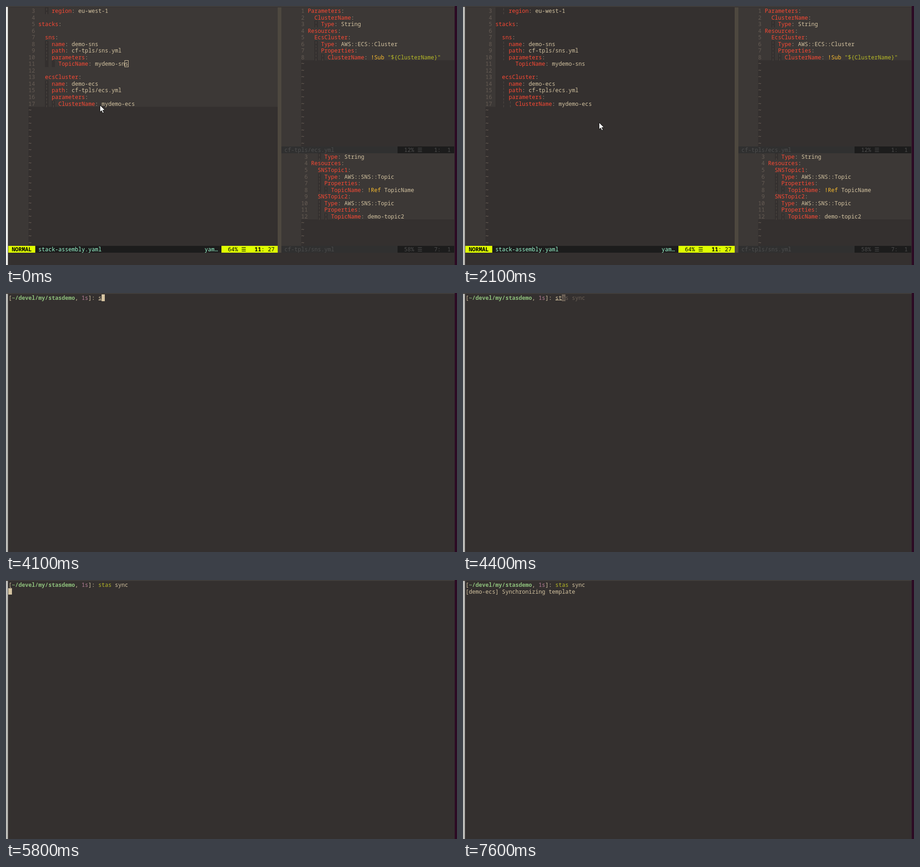
Write an HTML page with a canvas that moves like this. It is 986x568 px and loops after 8 s.

```html
<!DOCTYPE html>
<html lang="en">
<head>
<meta charset="utf-8">
<title>Terminal session</title>
<style>
html, body { margin: 0; width: 100%; height: 100%; overflow: hidden; background: #34302f; }
canvas { display: block; }
</style>
</head>
<body>
<canvas id="stage" width="986" height="568"></canvas>
<script>
const ctx = document.getElementById('stage').getContext('2d');
const LOOP = 8000, CW = 7.27, RH = 14.54, LEFT = 5.4, TOP = 3;
const C = {
  bg: '#34302f', light: '#3c3836', split: '#4e483f', fg: '#d5c4a1', red: '#fb4934',
  colon: '#a89984', yellow: '#fabd2f', green: '#b8bb26', path: '#8ec07c', time: '#b9809a',
  num: '#665c54', dim: '#6b6056', guide: '#5a514b', bar: '#1c1c1c', barOff: '#303030',
  barText: '#4e4e4e', lime: '#dfff00', mint: '#9cffd3', black: '#000'
};

const px = col => Math.round(LEFT + col * CW);
const py = row => Math.round(TOP + row * RH);

function cells(col, row, cols, rows, color) {
  ctx.fillStyle = color;
  ctx.fillRect(px(col), py(row), px(col + cols) - px(col), py(row + rows) - py(row));
}

// Writes on the character grid and returns the next free column.
function write(text, col, row, color, bold) {
  ctx.font = (bold ? 'bold ' : '') + '12.1px "Noto Sans Mono", "DejaVu Sans Mono", monospace';
  ctx.fillStyle = color;
  for (const ch of text) {
    if (ch !== ' ') ctx.fillText(ch, LEFT + col * CW, py(row) + 11.5);
    col++;
  }
  return col;
}

function underline(col, row, n) {
  ctx.fillStyle = C.fg;
  ctx.fillRect(px(col), py(row) + 12, px(col + n) - px(col), 1);
}

const stackFile = `    region: eu-west-1

stacks:

  sns:
    name: demo-sns
    path: cf-tpls/sns.yml
    parameters:
      TopicName: mydemo-sns

  ecsCluster:
    name: demo-ecs
    path: cf-tpls/ecs.yml
    parameters:
      ClusterName: mydemo-ecs`.split('\n');

const ecsFile = `Parameters:
  ClusterName:
    Type: String
Resources:
  EcsCluster:
    Type: AWS::ECS::Cluster
    Properties:
      ClusterName: !Sub "\${ClusterName}"`.split('\n');

const snsFile = `    Type: String
Resources:
  SNSTopic1:
    Type: AWS::SNS::Topic
    Properties:
      TopicName: !Ref TopicName
  SNSTopic2:
    Type: AWS::SNS::Topic
    Properties:
      TopicName: demo-topic2`.split('\n');

function yamlLine(line, col, row, current) {
  const match = line.match(/^( *)(\w+)(:)( ?)(!\w+)?(.*)$/);
  if (!match) return;
  const [, indent, key, colon, gap, tag = '', value] = match;
  for (let i = 2; i < indent.length; i += 2) {
    cells(col + i, row, 1, 1, C.bg);
    if (!current) write('¦', col + i, row, C.guide);
  }
  let x = write(key, col + indent.length, row, C.red);
  x = write(colon, x, row, C.colon) + gap.length;
  x = write(tag, x, row, C.yellow);
  write(value, x, row, value.includes('"') ? C.green : C.fg);
}

function pane(lines, o) {
  const end = o.row + lines.length;
  cells(o.gutter, o.row, o.numCol - o.gutter, o.last - o.row, C.light);
  cells(o.numCol, o.row, o.col - o.numCol, lines.length, C.light);
  if (o.lit) cells(o.col, o.row, o.right - o.col, lines.length, C.light);
  lines.forEach((line, i) => {
    const n = String(o.first + i);
    write(n, o.col - 1 - n.length, o.row + i, C.num);
    yamlLine(line, o.col, o.row + i, i === o.current);
  });
  for (let r = end; r < o.last; r++) write('~', o.numCol, r, '#7c6f64');
}

function idleBar(row, file, percent, line) {
  cells(82, row, 35, 1, C.barOff);
  cells(117, row, 17, 1, C.bar);
  write(file, 83, row, C.barText);
  write(percent + ' ☰', 119, row, C.barText);
  write(line + ':  1', 128, row, C.barText);
}

function activeBar() {
  cells(0, 36, 8, 1, C.lime);
  cells(8, 36, 56, 1, C.bar);
  cells(64, 36, 17, 1, C.lime);
  write('NORMAL', 1, 36, C.black, true);
  write('stack-assembly.yaml', 9, 36, C.mint);
  write('yam…', 59, 36, C.mint);
  write('64% ☰', 66, 36, C.black);
  write('11', 74, 36, C.black, true);
  write(': 27', 76, 36, C.black);
}

function pointer(x, y) {
  ctx.beginPath();
  [[0, 0], [0, 15], [3.5, 12], [6, 17.5], [8.5, 16.3], [6, 11], [10.7, 10.6]]
    .forEach(([dx, dy]) => ctx.lineTo(x + dx + 0.5, y + dy + 0.5));
  ctx.closePath();
  ctx.fillStyle = '#fff';
  ctx.strokeStyle = '#111';
  ctx.lineWidth = 1;
  ctx.fill();
  ctx.stroke();
}

function editor(t) {
  pane(stackFile, { gutter: 0, numCol: 6, col: 9, right: 81, row: 0, last: 36,
                    first: 3, lit: t < 700, current: 8 });
  pane(ecsFile, { gutter: 82, numCol: 88, col: 90, right: 134, row: 0, last: 21,
                  first: 1, lit: true });
  pane(snsFile, { gutter: 82, numCol: 88, col: 91, right: 134, row: 22, last: 36,
                  first: 3, lit: true });
  cells(81, 0, 1, 37, C.split);
  activeBar();
  idleBar(21, 'cf-tpls/ecs.yml', '12%', '1');
  idleBar(36, 'cf-tpls/sns.yml', '58%', '7');

  if (t < 600) {
    ctx.strokeStyle = C.fg;
    ctx.lineWidth = 1;
    ctx.strokeRect(px(35) - 0.5, py(8) + 0.5, 8, 14);
  } else if (t < 1200 || (t >= 1600 && t < 2100)) {
    cells(35, 8, 1, 1, C.fg);
    write('s', 35, 8, C.bg);
  }
  if (t < 100) pointer(205, 217);
  else if (t < 200) pointer(272, 246);
  else pointer(297, 255);
}

function block(col, row) { cells(col, row, 1, 1, C.fg); }

function typing(t) {
  const start = 27;
  if (t < 4100) {
    if (t < 3500) block(start, 0);
    return;
  }
  if (t < 4900) {
    const typed = t < 4400 ? 's' : t < 4600 ? 'st' : 'sta';
    const at = start + typed.length;
    write(typed, start, 0, C.fg);
    underline(start, 0, typed.length);
    if (t < 4200) return block(at, 0);
    const rest = t < 4400 ? 'ed -n "/Resources/p" cf-tpls/*.yml | sort -u > all' : 'stas sync'.slice(typed.length);
    cells(at, 0, 1, 1, C.dim);
    write(rest[0], at, 0, C.bg);
    write(rest.slice(1), at + 1, 0, C.dim);
    if (t < 4400) {
      write('cat all', 0, 1, C.dim);
      write('rm all', 0, 2, C.dim);
    }
    return;
  }
  write('stas', start, 0, C.green);
  write('sync', start + 5, 0, t < 5400 ? C.dim : C.fg);
  if (t < 5400) block(start + 4, 0);
  else if (t < 5800) block(start + 9, 0);
  else if (t < 6400 || (t >= 7100 && t < 7500)) block(0, 1);
  if (t >= 7500) write('[demo-ecs] Synchronizing template', 0, 1, C.fg);
  if (t >= 7500 && t < 7600) block(0, 2);
}

function shell(t) {
  let x = write('[', 0, 0, C.fg);
  x = write('~/devel/my/stasdemo', x, 0, C.path, true);
  x = write(', ', x, 0, C.fg);
  x = write('1s', x, 0, C.time);
  write(']:', x, 0, C.fg);
  typing(t);
}

function frame(t) {
  ctx.fillStyle = C.bg;
  ctx.fillRect(0, 0, 986, 568);
  if (t < 3100) editor(t);
  else shell(t);
  ctx.fillStyle = '#413e3c';
  ctx.fillRect(0, 0, 986, 2);
  ctx.fillStyle = t < 600 ? '#eeeeec' : '#bdbdba';
  ctx.fillRect(0, 2, 4, 566);
  ctx.fillStyle = '#55524f';
  ctx.fillRect(4, 2, 1, 566);
  ctx.fillStyle = '#2c0a24';
  ctx.fillRect(981, 0, 5, 568);
}

function tick() {
  frame(performance.now() % LOOP);
  requestAnimationFrame(tick);
}
tick();
</script>
</body>
</html>
```
